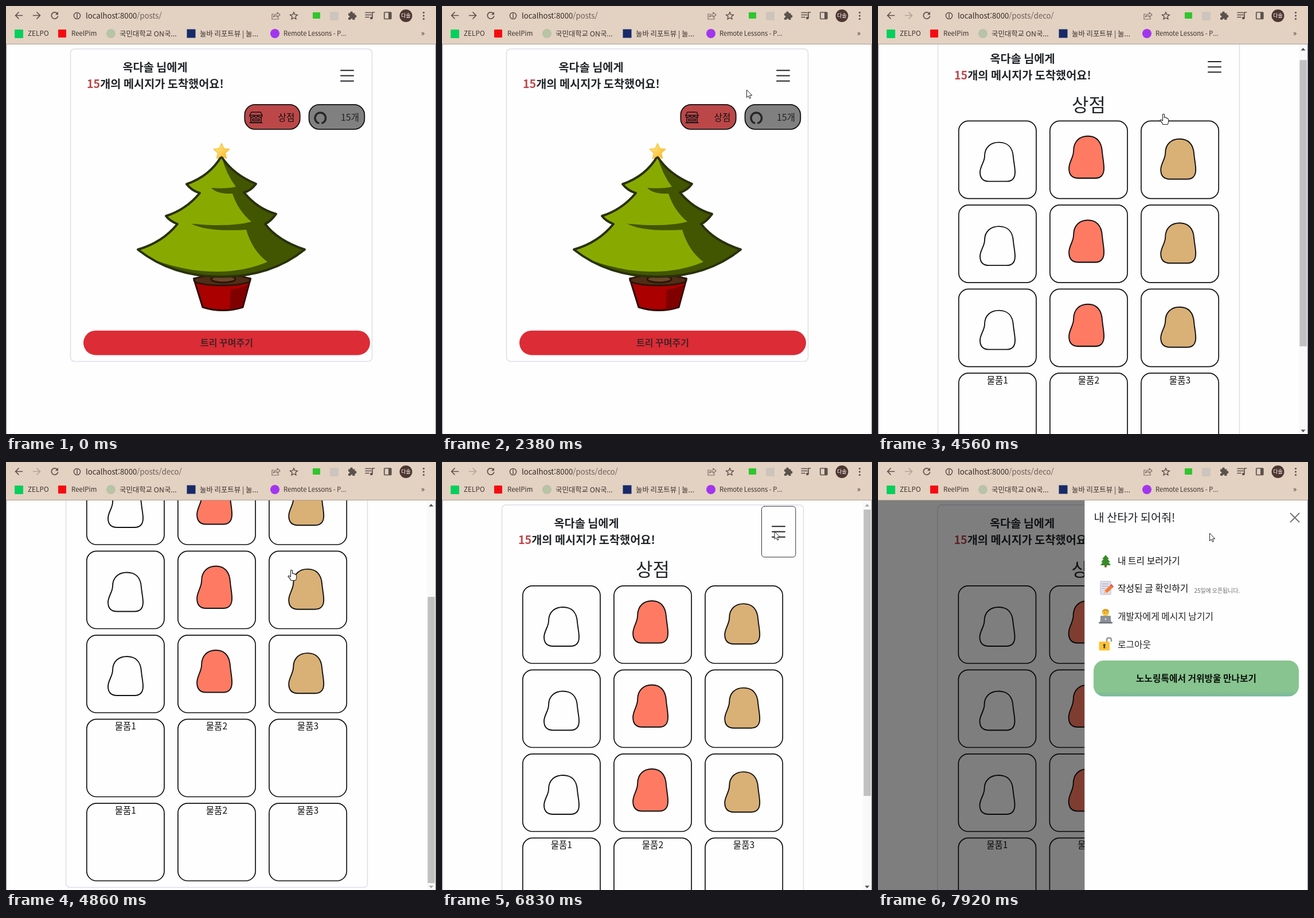
An HTML page with a canvas that plays this animation: 750 px wide and 746 px high, repeating every 8000 ms.

```html
<!DOCTYPE html>
<html lang="ko">
<head>
<meta charset="utf-8">
<title>트리 꾸미기</title>
<style>
html, body { margin: 0; width: 100%; height: 100%; overflow: hidden; background: #fefefe; }
canvas { display: block; }
</style>
</head>
<body>
<canvas id="stage" width="750" height="746"></canvas>
<script>
const ctx = document.getElementById('stage').getContext('2d');
const W = 750, H = 746, TOP = 67, LOOP = 8000;
const FONT = '"Noto Sans CJK KR", "Noto Sans CJK", "Noto Sans", sans-serif';
const INK = '#212529', BAR = '#e3d1c1', ICON = '#5b524c', PAPER = '#fefefe', RED = '#bc4749';

// Bursts of screen updates: start, end, number of steps
const BURSTS = [
  [0, 0, 1], [290, 390, 2], [590, 1090, 6], [1980, 2080, 2], [2380, 2780, 5], [2970, 3160, 3],
  [3360, 3560, 3], [4560, 4860, 4], [5360, 5650, 4], [5840, 6140, 4], [6730, 7220, 6], [7920, 7920, 1]
];
// Pointer stops: time, x, y
const STOPS = [
  [290, 501, 104], [390, 398, 10], [490, 398, 10], [1090, 522, 132], [1880, 522, 132],
  [2080, 561, 127], [2280, 561, 127], [2380, 531, 146], [2780, 498, 188], [5740, 498, 188],
  [6140, 583, 122], [6630, 583, 122], [6730, 580, 121], [6926, 579, 121], [7900, 579, 121], [7920, 578, 124]
];
const MENU_AT = 6836;

const clamp = v => Math.max(0, Math.min(1, v));
const ramp = (t, a, b) => clamp((t - a) / (b - a));
const ease = u => u * u * (3 - 2 * u);

function snap(t) {
  const [a, b, n] = BURSTS.filter(s => s[0] <= t).pop();
  if (n < 2) return a;
  const step = (b - a) / (n - 1);
  return a + Math.min(n - 1, Math.floor((t - a) / step + 1e-6)) * step;
}

function pointerAt(t) {
  const i = STOPS.findIndex(s => s[0] > t);
  if (i < 0) return STOPS[STOPS.length - 1].slice(1);
  const [t0, x0, y0] = STOPS[i - 1], [t1, x1, y1] = STOPS[i];
  const u = ramp(t, t0, t1);
  return [x0 + (x1 - x0) * u, y0 + (y1 - y0) * u];
}

function paint(p, fill, stroke, lw = 1.5) {
  if (fill) { ctx.fillStyle = fill; ctx.fill(p); }
  if (stroke) { ctx.strokeStyle = stroke; ctx.lineWidth = lw; ctx.stroke(p); }
}
const path = (d, fill, stroke, lw) => paint(new Path2D(d), fill, stroke, lw);

function box(x, y, w, h, r, fill, stroke, lw) {
  const p = new Path2D();
  p.roundRect(x, y, w, h, r);
  paint(p, fill, stroke, lw);
}

function oval(x, y, rx, ry, fill, stroke, lw) {
  const p = new Path2D();
  p.ellipse(x, y, rx, ry, 0, 0, 7);
  paint(p, fill, stroke, lw);
}
const dot = (x, y, r, fill, stroke, lw) => oval(x, y, r, r, fill, stroke, lw);

function star(x, y, R, r, fill, stroke, lw) {
  const p = new Path2D();
  for (let i = 0; i < 10; i++) {
    const a = i * Math.PI / 5 - Math.PI / 2, d = i % 2 ? r : R;
    p.lineTo(x + d * Math.cos(a), y + d * Math.sin(a));
  }
  p.closePath();
  paint(p, fill, stroke, lw);
}

function text(s, x, y, size, color = INK, weight = 400, align = 'left') {
  ctx.font = `${weight} ${size}px ${FONT}`;
  ctx.textAlign = align;
  ctx.fillStyle = color;
  ctx.fillText(s, x, y);
  return ctx.measureText(s).width;
}

function at(x, y, draw) {
  ctx.save();
  ctx.translate(x, y);
  draw();
  ctx.restore();
}

function toolbar(shop) {
  ctx.fillStyle = BAR;
  ctx.fillRect(0, 0, W, 66);
  ctx.fillStyle = '#aea197';
  ctx.fillRect(0, 66, W, 1);

  path('M28.5 16.5H16.5M22 11L16.5 16.5L22 22', null, ICON, 1.7);
  path('M47.5 16.5H59.5M54 11L59.5 16.5L54 22', null, shop ? '#b3a598' : ICON, 1.7);
  path('M89.5 13A5.7 5.7 0 1 0 90.5 18', null, ICON, 1.7);
  path('M91 10V15.2H85.8Z', ICON);
  dot(124, 17, 5.6, null, ICON, 1.5);
  path('M124 16V20.2M124 13.4V14.8', null, ICON, 1.6);
  const w = text('localhost:8000', 139, 22, 13.2, '#332b26');
  text(shop ? '/posts/deco/' : '/posts/', 139 + w, 22, 13.2, '#6a5f57');

  path('M467 14H464V23H475V20M466.5 19Q467 14 473 14V11L478 15.5L473 19.5V16.8Q469 16.6 466.5 19Z', null, '#7b7068', 1.2);
  star(502, 17.5, 7, 3, null, ICON, 1.4);
  box(535, 11, 13, 11, 1, '#2fc62f');
  box(565, 10, 15, 15, 1, '#cdc5bd');
  box(597, 12.5, 11.5, 11.5, 1, ICON);
  dot(602.5, 12, 2.4, ICON);
  dot(609, 18, 2.4, ICON);
  dot(597.3, 18.4, 1.9, BAR);
  dot(602.8, 24, 1.9, BAR);
  path('M627 11.5H637M627 15.5H637M627 19.5H633M639 21V11H642.5', null, ICON, 1.7);
  dot(637.2, 21, 2.3, ICON);
  box(659.8, 11, 12, 11.5, 1, null, ICON, 1.7);
  ctx.fillStyle = ICON;
  ctx.fillRect(667, 11, 5, 11);
  dot(697.5, 17, 11, '#4f3731');
  text('다솔', 697.5, 20.3, 9, '#fff', 400, 'center');
  for (const y of [11.5, 17, 22.5]) dot(728.5, y, 1.6, ICON);

  box(15, 41, 15, 15, 1, '#06cf5d');
  box(91, 41, 14, 14, 1, '#f40b12');
  dot(183, 48, 8, '#b9c3a6');
  box(315.5, 40.5, 15, 15, 0, '#172a68');
  dot(469, 48, 8, '#a235ee');
  const ink = '#3a322d';
  text('ZELPO', 38, 52, 11.8, ink);
  text('ReelPim', 114, 52, 11.5, ink);
  text('국민대학교 ON국...', 198, 52.5, 12.4, ink);
  text('눌바 리포트뷰 | 눌...', 338, 52.5, 12.4, ink);
  text('Remote Lessons - P...', 484, 52, 11.2, ink);
  text('»', 727, 52, 13, ink, 400, 'center');
}

function cardHead(bottom) {
  box(112.5, 74.8, 526, bottom - 74.8, 7, PAPER, '#dbdfe7', 1.5);
  text('옥다솔 님에게', 260, 114.3, 19.7, INK, 700, 'center');
  const w = text('15', 141, 143.3, 19.7, RED, 700);
  text('개의 메시지가 도착했어요!', 141 + w, 143.3, 19.7, INK, 700);
  path('M584 112.3H606M584 121.5H606M584 130.7H606', null, INK, 2);
}

function tree() {
  const dark = '#425500', line = '#29300e';
  path('M327.5 475Q377 466 426.5 475L413 525Q378 536 343 525Z', '#aa0000', '#2a0c05', 3);
  path('M392 494Q412 492 423.5 484L412 524Q402 528 390 529Z', '#800000');
  oval(377, 478, 49, 9, '#502d16', '#2a1508', 3);
  oval(379, 476, 21, 6, '#6c4629', '#2a1508', 3);

  const shape = new Path2D('M375.5 262Q356 296 315 310.5Q324 322 338 326Q314 355 279 366Q286 375 299 380Q273 412 230 424.5' +
    'Q290 472 376 472Q462 472 521 424.5Q474 409 452 380Q462 375 471 362.5Q438 353 415 325Q427 322 436 310Q395 293 375.5 262Z');
  paint(shape, '#88aa00');
  ctx.save();
  ctx.clip(shape);
  path('M375 258Q383 292 401 315Q384 319 358 317Q368 328 395 327Q405 357 428 376Q390 386 323 379.5Q351 394 419 390' +
    'Q430 427 456 446Q400 470 325 460Q290 454 262 444L290 480H530V258Z', dark);
  ctx.restore();
  ctx.lineJoin = 'round';
  paint(shape, null, line, 4);

  const glow = ctx.createLinearGradient(365, 242, 386, 264);
  glow.addColorStop(0, '#ffe884');
  glow.addColorStop(1, '#fcb92f');
  star(376, 254, 14.5, 6.8, glow, '#f5c445', 1.5);
}

function homePage() {
  cardHead(619.5);
  box(416.3, 171.8, 96.4, 43, 18, RED, '#111', 1.8);
  path('M427 194V203H445V194M428 185H444L447 190.5Q446.8 194 443.5 194Q440.5 194 439.5 191.5Q438.5 194 436 194' +
    'Q433.5 194 432.5 191.5Q431.5 194 428.5 194Q425.2 194 425 190.5ZM425 190.5H447M425 203.4H447M430 197H442V200H430Z', null, '#111', 1.5);
  text('상점', 489, 200, 15.7, '#111', 500, 'center');
  box(528.5, 171.8, 96.8, 43, 18, '#808080', '#111', 1.8);
  path('M545 204A9.3 9.3 0 1 1 551.5 204', null, '#262626', 3.4);
  text('15개', 600, 200, 15.7, '#222', 400, 'center');
  tree();
  box(135, 565.7, 500, 42.8, 21.4, '#dc2c36');
  text('트리 꾸며주기', 385, 593, 16, '#472326', 700, 'center');
}

// Fill, x shift, y shift and height of the goods in each column
const GOODS = [['#fefefe', 0, 0, 1], ['#ff7a63', -4, -14, 1.08], ['#d9b076', -3, -7, 1.03]];
const BLOB = 'M46 62C46 46 57 38 71 38S95 46 96 64C97 74 99 82 99 90C99 102 92 106 84 106H54C44 106 38 101 38 90C38 80 46 72 46 62Z';

function shopPage(focused) {
  at(-8, 0, () => {
    cardHead(948.5);
    if (focused) box(565.5, 77.2, 59.3, 88.6, 5, null, '#333', 1);
  });
  text('상점', 367.5, 199.3, 32, INK, 500, 'center');
  for (let row = 0; row < 5; row++) {
    GOODS.forEach(([fill, dx, dy, s], col) => at(140 + col * 159.1, 215 + row * 146.5, () => {
      box(.8, .8, 135.2, 135.2, 17, PAPER, '#111', 1.7);
      if (row > 2) return text('물품' + (col + 1), 68.3, 18.7, 15.6, '#111', 400, 'center');
      ctx.translate(dx, dy);
      ctx.scale(1, s);
      path(BLOB, fill, '#111', 1.9);
    }));
  }
}

function scrollbar(pos) {
  ctx.fillStyle = '#f9f9f9';
  ctx.fillRect(734, TOP, 15, H - TOP);
  ctx.fillStyle = '#c1c1c1';
  ctx.fillRect(735.5, 83 + 152 * pos, 12.5, 499);
  path('M737.5 77.5L741.5 73L745.5 77.5Z', pos > 0 ? '#505050' : '#a8a8a8');
  path('M737.5 738.5L741.5 743L745.5 738.5Z', pos < 1 ? '#505050' : '#a8a8a8');
}

function menuIcons() {
  path('M35 177H39V183.5H35Z', '#8a5a3c');
  path('M37 162L43 169H40.5L45 174.5H42L46 180H28L32 174.5H29L33.5 169H31Z', '#368a28');

  box(28, 208, 18, 23, 1.5, '#e2dfec', '#b9b3cb', 1);
  path('M31 212.5H42M31 216.5H41M31 220.5H36', null, '#a79fc0', 1);
  path('M34 229L35.5 224L45 214.5L49.5 219L39.5 228Z', '#f47b32');
  path('M34 229L35.5 224L39.5 228Z', '#f3c793');
  path('M45 214.5L47 212.7L51 217L49.5 219Z', '#e0476b');

  path('M27 281Q27 270 37 269Q47 270 47 281Z', '#4687c9');
  dot(37, 262.5, 6, '#fcc63f');
  path('M31 262Q31 256 37 256T43 262Q41 260 37 260T31 262Z', '#d99a25');
  dot(35, 263, .8, '#6a4a20');
  dot(39, 263, .8, '#6a4a20');
  box(28, 268, 18, 12, 1, '#8d9096');
  box(25, 279, 24, 2.5, 1, '#6d7077');
  dot(37, 274, 1.4, '#d8dade');

  path('M39 314V310Q39 306.5 43 306.5T47 310V312', null, '#8f98a3', 2.6);
  box(25.5, 313, 18.5, 15.5, 2, '#fdc334');
  dot(34.8, 319, 2.1, '#43464d');
  path('M34 319H35.6L36.5 324.5H33Z', '#43464d');
}

function menu(x) {
  at(x, 0, () => {
    ctx.fillStyle = PAPER;
    ctx.fillRect(0, TOP, 400, H - TOP);
    ctx.fillStyle = '#cfcfcf';
    ctx.fillRect(0, TOP, 1, H - TOP);
    text('내 산타가 되어줘!', 16.5, 104, 19.7, INK, 400);
    path('M359.5 89.5L374.5 104.5M374.5 89.5L359.5 104.5', null, '#757575', 2);
    menuIcons();
    text('내 트리 보러가기', 58, 177.5, 15.8, '#111', 500);
    text('작성된 글 확인하기', 58, 226, 15.8, '#111', 500);
    text('25일에 오픈됩니다.', 191.5, 228, 9.9, '#6c6c6c');
    text('개발자에게 메시지 남기기', 58, 275, 15.8, '#222');
    text('로그아웃', 58, 324, 15.8, '#222');
    const green = ctx.createLinearGradient(0, 346, 0, 408);
    green.addColorStop(0, '#87c48f');
    green.addColorStop(.86, '#87c48f');
    green.addColorStop(1, '#78b99c');
    box(16, 346, 358, 62.5, 18, green);
    text('노노링톡에서 거위방울 만나보기', 195, 383.3, 15.75, '#0c0f0c', 700, 'center');
  });
}

function statusBubble(alpha) {
  if (alpha <= 0) return;
  ctx.globalAlpha = alpha;
  box(0, 728, 156, 20, [0, 4, 0, 0], BAR, '#b9aca0', 1);
  text('localhost:8000/posts/deco/', 5, 741.5, 11.2, '#5f5650');
  ctx.globalAlpha = 1;
}

function pointer(t) {
  if (t < STOPS[0][0]) return;
  const [x, y] = pointerAt(t);
  at(x, y, () => {
    if (y < 30) path('M1 .5H6M3.5 .5V16M1 16H6', null, '#222', 1.2);
    else if (t >= 2670 && t < 5840) {
      path('M-1.5 10V1.2Q0 -.8 1.5 1.2V6.5Q4 5.5 4.5 7.2Q7 6.7 7 8.5Q8.8 8.5 8.8 10V13Q8.5 16 7 18.5H-1Q-2 15.5 -6 11.5Q-5.5 9.3 -3.4 10.8L-1.5 12Z', '#fff', '#222', 1.1);
    } else path('M.5 .5V13.5L3.4 10.7L5.4 15.2L7.5 14.3L5.6 9.8H9.4Z', '#fff', '#222', 1);
  });
}

function draw(now) {
  const t = snap(now);
  const shop = t >= 2970;
  const open = t >= MENU_AT;
  const scroll = ease(ramp(t, 4500, 4860)) - ease(ramp(t, 5300, 5650));

  ctx.fillStyle = PAPER;
  ctx.fillRect(0, 0, W, H);
  ctx.lineCap = ctx.lineJoin = 'round';

  at(open ? -.5 : 0, -207 * scroll, () => shop ? shopPage(t >= 6730) : homePage());
  if (shop && !open) scrollbar(scroll);
  if (open) {
    ctx.fillStyle = `rgba(0,0,0,${.5 * ramp(t, MENU_AT, MENU_AT + 150)})`;
    ctx.fillRect(0, TOP, W, H - TOP);
    menu(360 + 390 * (1 - ease(ramp(t, MENU_AT, MENU_AT + 300))));
  }
  statusBubble(ramp(t, 2580, 2780) - ramp(t, 3260, 3560));
  ctx.fillStyle = '#8c8a88';
  ctx.fillRect(0, TOP, 1, H - TOP);
  ctx.fillRect(749, TOP, 1, H - TOP);
  toolbar(shop);
  pointer(t);
}

const start = performance.now();
function tick() {
  draw((performance.now() - start) % LOOP);
  requestAnimationFrame(tick);
}
tick();
</script>
</body>
</html>
```
